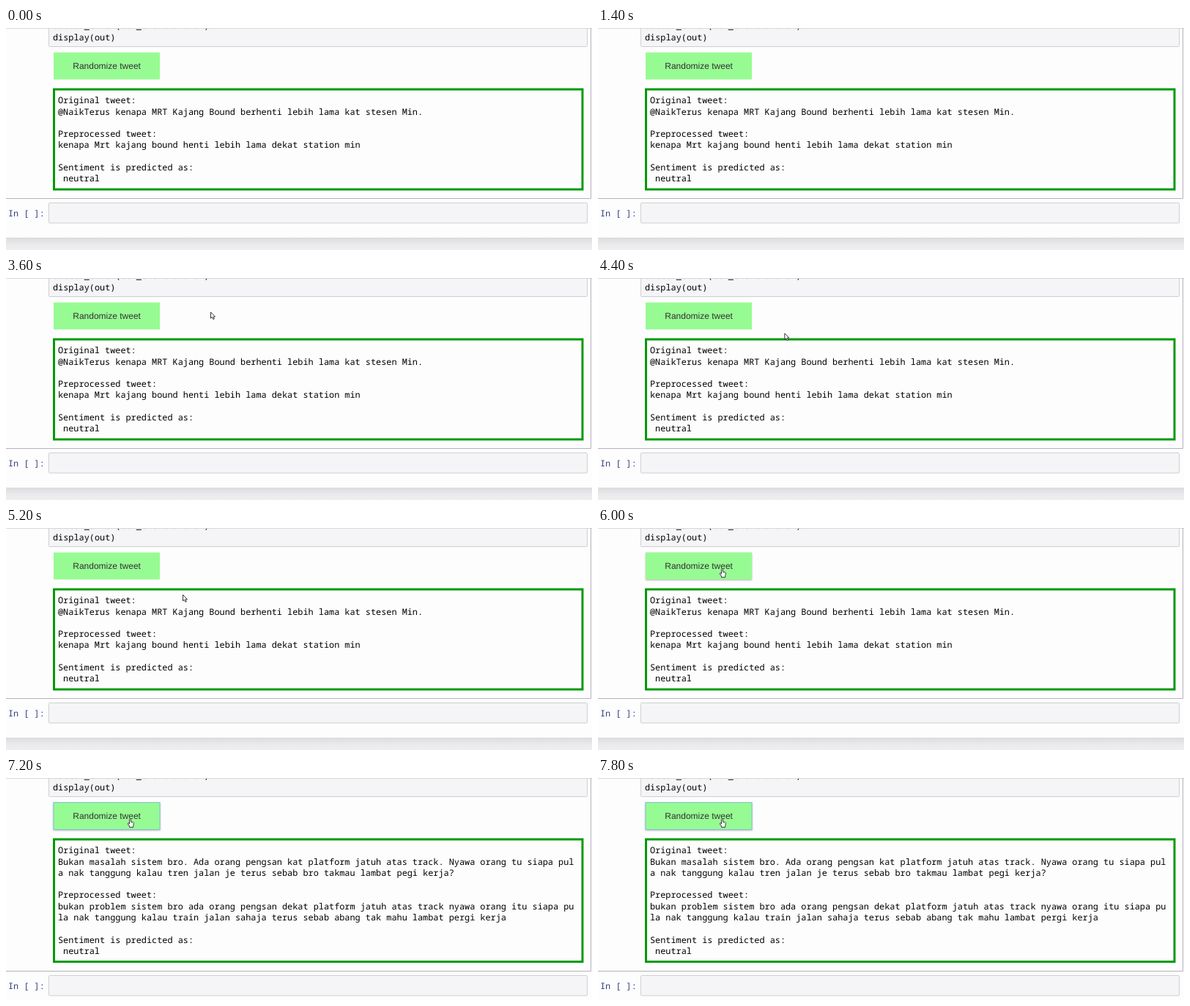
Write an HTML page that moves like this. It is 800 by 304 pixels and loops after 8000 ms.

```html
<!DOCTYPE html>
<html lang="en">
<head>
<meta charset="utf-8">
<title>Tweet sentiment notebook</title>
<style>
  html, body { margin: 0; width: 100%; height: 100%; overflow: hidden; background: #fefdfe; }
  svg { display: block; width: 100%; height: 100%; }
  text { font: 11.86px "Noto Sans Mono", monospace; white-space: pre; text-rendering: geometricPrecision; }
  .field { fill: #f5f4f6; stroke: #cfcfd1; }
  .prompt { fill: #303f7f; }
  #button text { font: 12px "Liberation Sans", Arial, sans-serif; fill: #333; text-anchor: middle; }
  #button.hover .face { filter: drop-shadow(0 1.5px 1.2px rgba(0, 0, 0, .3)); }
  #button.focus .face { stroke: #7cc4d8; }
  .pointer { fill: #fff; stroke: #222; stroke-width: .9; stroke-linejoin: round; }
</style>
</head>
<body>
<svg viewBox="0 0 800 304">
  <defs>
    <linearGradient id="shade" x2="0" y2="1">
      <stop stop-color="#dcdbdd"/>
      <stop offset=".6" stop-color="#ebeaec"/>
      <stop offset="1" stop-color="#eeedef"/>
    </linearGradient>
  </defs>
  <rect width="800" height="304" fill="#fefdfe"/>
  <rect class="field" x="58.5" y="-9.5" width="735" height="35" rx="1"/>
  <text x="64" y="1.4">button_click(btn_eventhandler)</text>
  <text x="64" y="16.7">display(out)</text>
  <rect width="800" height="1" fill="#d8d7da"/>

  <g id="button">
    <rect class="face" x="65" y="33.5" width="145" height="37" fill="#97fb93"/>
    <text x="137.6" y="56">Randomize tweet</text>
  </g>

  <rect id="frame" x="65.5" y="84" width="721.5" fill="none" stroke="#009a06" stroke-width="3"/>
  <g id="output"></g>

  <g id="below">
    <path d="M0 233.5H798.5V-40" fill="none" stroke="#b4b2b8"/>
    <text class="prompt" x="3" y="257.6">In [ ]:</text>
    <rect class="field" x="58.5" y="239.5" width="735" height="27.5" rx="1"/>
    <rect y="287" width="800" height="17" fill="url(#shade)"/>
  </g>

  <path id="arrow" class="pointer" d="M0 0V8.4L2 6.7 3.4 9.8 4.9 9.1 3.5 6.2H6Z"/>
  <path id="hand" class="pointer" d="M-1 1Q0-.6 1 1V4.4L4.2 5Q5.2 5.3 5 6.5L4.2 9.6V11.6H-1V10L-3.2 7Q-3.2 5.6-1.8 6.2L-1 7Z"/>
</svg>
<script>
const LOOP = 8000, LINE = 15.3;
const APPEAR = 3000, FOCUS = 6800, RESULT = 7200;

const report = (tweet, cleaned) => [
  "Original tweet:", ...tweet, "",
  "Preprocessed tweet:", ...cleaned, "",
  "Sentiment is predicted as:", " neutral"
];
const reports = [
  report(
    ["@NaikTerus kenapa MRT Kajang Bound berhenti lebih lama kat stesen Min."],
    ["kenapa Mrt kajang bound henti lebih lama dekat station min"]),
  report(
    ["Bukan masalah sistem bro. Ada orang pengsan kat platform jatuh atas track. Nyawa orang tu siapa pul",
     "a nak tanggung kalau tren jalan je terus sebab bro takmau lambat pegi kerja?"],
    ["bukan problem sistem bro ada orang pengsan dekat platform jatuh atas track nyawa orang itu siapa pu",
     "la nak tanggung kalau train jalan sahaja terus sebab abang tak mahu lambat pergi kerja"])
];

// Pointer path: time, x, y
const path = [
  [0, 279.5, 46.8], [3800, 279.5, 46.8],
  [4800, 241.5, 91.5], [5200, 241.5, 91.5],
  [6000, 169.5, 55.8], [LOOP, 169.5, 55.8]
];

const byId = id => document.getElementById(id);
const [button, frame, output, below, arrow, hand] =
  ["button", "frame", "output", "below", "arrow", "hand"].map(byId);
let shown = -1;

function showReport(index) {
  if (index === shown) return;
  shown = index;
  const lines = reports[index];
  output.innerHTML = lines.map((line, i) =>
    `<text x="71" y="${103.2 + i * LINE}">${line}</text>`).join("");
  const extra = (lines.length - reports[0].length) * LINE;
  frame.setAttribute("height", 137 + extra);
  below.setAttribute("transform", `translate(0 ${Math.round(extra)})`);
}

function pointerAt(t) {
  const next = path.findIndex(key => key[0] > t);
  const [t0, x0, y0] = path[next - 1], [t1, x1, y1] = path[next];
  const p = (t - t0) / (t1 - t0), ease = p * p * (3 - 2 * p);
  return [x0 + (x1 - x0) * ease, y0 + (y1 - y0) * ease];
}

function place(pointer, x, y, visible) {
  pointer.setAttribute("transform", `translate(${x} ${y})`);
  pointer.setAttribute("visibility", visible ? "visible" : "hidden");
}

function draw() {
  const t = performance.now() % LOOP;
  const [x, y] = pointerAt(t);
  const hover = x > 65 && x < 210 && y > 33 && y < 71;
  showReport(t < RESULT ? 0 : 1);
  button.classList.toggle("hover", hover);
  button.classList.toggle("focus", t >= FOCUS);
  place(arrow, x, y, t >= APPEAR && !hover);
  place(hand, x, y, hover);
  requestAnimationFrame(draw);
}
draw();
</script>
</body>
</html>
```
